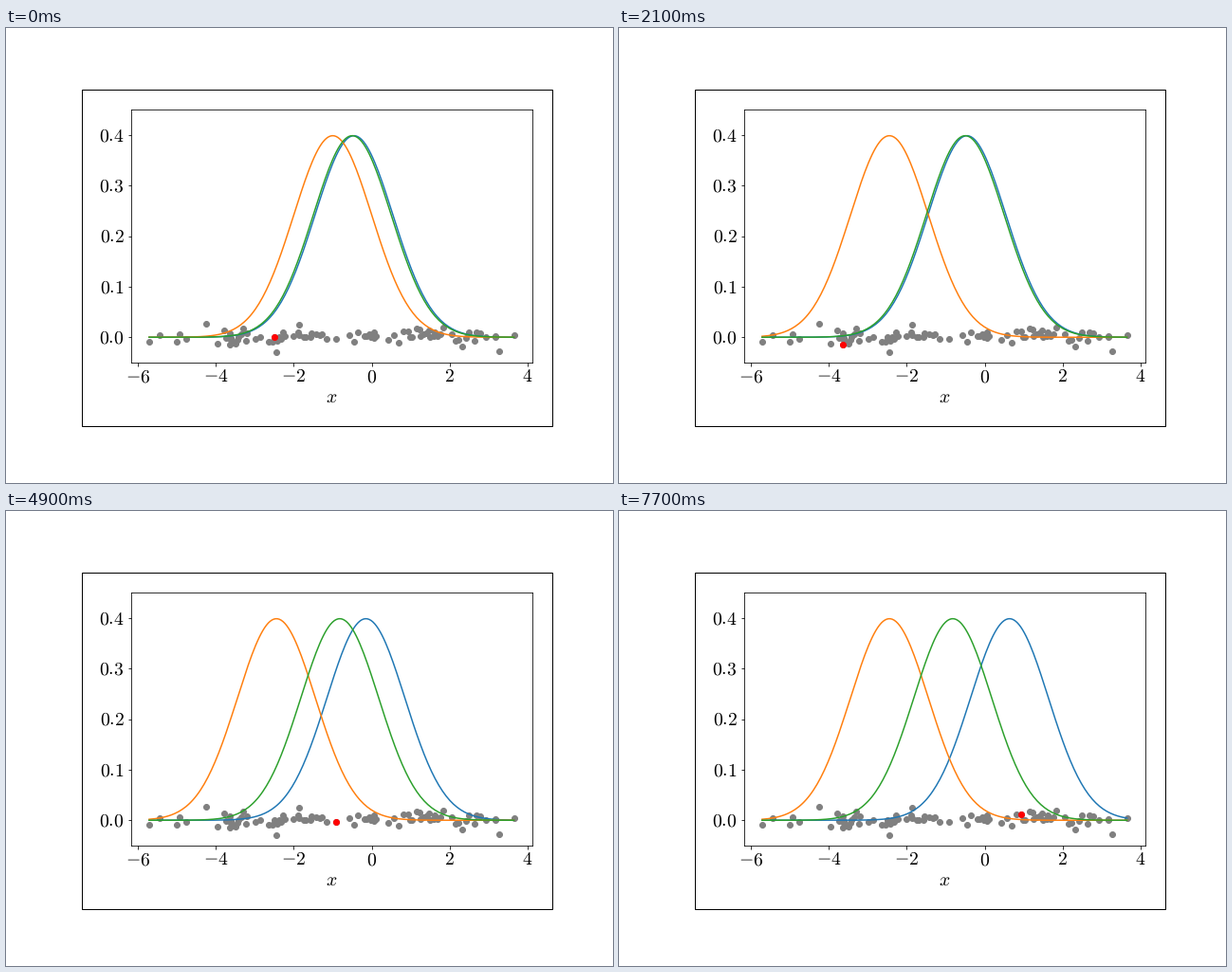
Animation, 640 px wide and 480 px high, one loop 8000 ms. Source, as a matplotlib script:

```python
import matplotlib.pyplot as plt
import numpy as np
from matplotlib.animation import FuncAnimation
from matplotlib.patches import Rectangle

W, H, DPI = 640, 480, 80
PX = 72 / DPI                      # points per pixel
LEFT, RIGHT, TOP, BOTTOM = 132, 555, 86.4, 352.9
X0, X_UNIT = 385.6, 41.1           # pixel of x = 0, pixels per unit
Y0, Y_UNIT = 326.25, 533
FONT = 19.7 * PX
X_TICKS, Y_TICKS = np.arange(-6, 5, 2), np.arange(5) / 10

STEP_FRAMES = 7                    # each step holds 700 ms
FRAMES, INTERVAL = 80, 100

# Step at which each value starts to apply
MEANS = {
    "#1f77b4": {0: -0.455, 5: -0.15, 9: 0.59, 11: 0.635},
    "#ff7f0e": {0: -1.0, 1: -1.405, 3: -2.445},
    "#2ca02c": {0: -0.5, 7: -0.82},
}
PICKS = {0: (-2.495, 0), 2: (-3.64, -0.015), 4: (-0.01, 0),
         6: (-0.92, -0.004), 8: (0.94, 0.011)}

# Groups of samples along x: start, end, count
GROUPS = [(-3.78, -3.2, 13), (-3, -2.68, 3), (-2.5, -2.23, 7), (-2, -1.18, 11),
          (-0.58, -0.38, 3), (-0.17, 0.13, 7), (0.45, 1.05, 6), (1.16, 1.75, 11),
          (2.03, 2.9, 10), (3.17, 3.2, 2)]
OUTLIERS = [(-5.71, -0.009), (-5.43, 0.005), (-5, -0.009), (-4.93, 0.007),
            (-4.76, -0.003), (-4.25, 0.026), (-3.96, -0.013), (-2.44, -0.03),
            (-1.87, 0.024), (1.84, 0.02), (3.28, -0.028), (3.65, 0.005)]


def samples():
    rng = np.random.default_rng(4)
    x = np.concatenate([np.linspace(*group) for group in GROUPS])
    x += rng.normal(0, 0.02, x.size)
    y = rng.normal(0.001, 0.007, x.size)
    return np.vstack([np.column_stack((x, y)), OUTLIERS, list(PICKS.values())])


def bell(mean):
    return np.exp(-(xs - mean) ** 2 / 2) / np.sqrt(2 * np.pi)


def at_step(changes, step):
    return changes[max(s for s in changes if s <= step)]


def label(x, y, text, ha="center"):
    fig.text(x / W, 1 - y / H, text, ha=ha, va="baseline", fontsize=FONT)


plt.rcParams.update({"mathtext.fontset": "cm", "text.hinting": "none"})
fig = plt.figure(figsize=(W / DPI, H / DPI), dpi=DPI, facecolor="white")
fig.add_artist(Rectangle((80 / W, 1 - 420 / H), 496 / W, 355 / H,
                         fill=False, ec="black", lw=PX))

ax = fig.add_axes([LEFT / W, 1 - BOTTOM / H, (RIGHT - LEFT) / W, (BOTTOM - TOP) / H])
ax.set_xlim((LEFT - X0) / X_UNIT, (RIGHT - X0) / X_UNIT)
ax.set_ylim((Y0 - BOTTOM) / Y_UNIT, (Y0 - TOP) / Y_UNIT)
ax.set_xticks(X_TICKS)
ax.set_yticks(Y_TICKS)
ax.tick_params(length=3.5 * PX, width=0.8 * PX, labelbottom=False, labelleft=False)
for spine in ax.spines.values():
    spine.set_linewidth(0.8 * PX)

for v in X_TICKS:
    label(X0 + v * X_UNIT, 373.1, f"${v}$")
for v in Y_TICKS:
    label(124.7, Y0 - v * Y_UNIT + 6.4, f"${v:.1f}$", ha="right")
label(343, 394.6, "$x$")

dot = dict(s=(6 * PX) ** 2, linewidths=PX)
ax.scatter(*samples().T, color="gray", **dot)
pick = ax.scatter([0], [0], color="red", **dot)

xs = np.linspace(-5.71, 3.65, 200)
curves = {c: ax.plot(xs, bell(m[0]), color=c, lw=1.5 * PX)[0]
          for c, m in MEANS.items()}


def update(i):
    step = i // STEP_FRAMES
    for color, line in curves.items():
        line.set_ydata(bell(at_step(MEANS[color], step)))
    pick.set_offsets([at_step(PICKS, step)])
    return [pick, *curves.values()]


anim = FuncAnimation(fig, update, frames=FRAMES, interval=INTERVAL,
                     repeat=True, repeat_delay=0)
plt.show()
```
